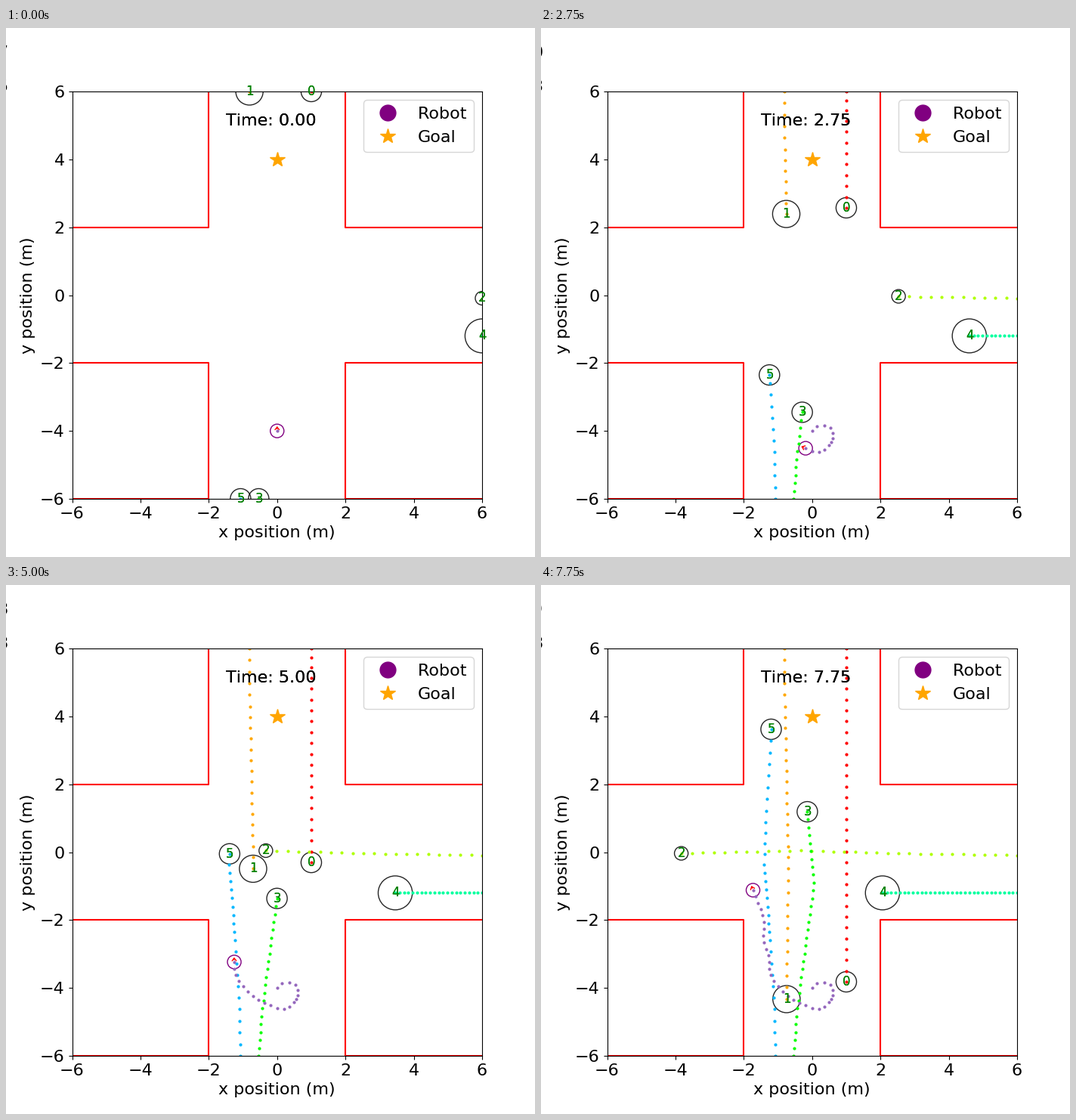
A matplotlib script that plays this animation: 700 px wide and 700 px high, repeating every 8000 ms.

```python
import random

import numpy as np
import matplotlib
import matplotlib.pyplot as plt
from matplotlib.animation import FuncAnimation
from matplotlib.lines import Line2D
from matplotlib.patches import ArrowStyle, Circle, FancyArrowPatch

FRAMES = 32
STEP = 0.25
RADII = [0.3, 0.4, 0.2, 0.3, 0.5, 0.3]
ROBOT_R = 0.2
steps = np.arange(FRAMES)
plt.rcParams["text.kerning_factor"] = 6


def march(*keys):
    """Straight, even moves between (step, x, y) keys."""
    t, x, y = np.transpose(keys)
    return np.column_stack([np.interp(steps, t, x), np.interp(steps, t, y)])


def curve(*keys):
    """Smooth cubic path through (step, x, y) keys."""
    keys = np.array(keys, float)
    t, p = keys[:, 0], keys[:, 1:]
    slope = np.gradient(p, t, axis=0)
    i = np.clip(np.searchsorted(t, steps, "right") - 1, 0, len(t) - 2)
    span = (t[i + 1] - t[i])[:, None]
    u = (steps - t[i])[:, None] / span
    ease = u * u * (3 - 2 * u)
    return (p[i] + (p[i + 1] - p[i]) * ease
            + span * u * (1 - u) * (slope[i] * (1 - u) - slope[i + 1] * u))


people = [
    march((0, 1, 6), (2, 1, 5.45), (31, 1, -3.82)),
    march((0, -.81, 6), (5, -.80, 4.29), (19, -.70, -.14), (31, -.75, -4.33)),
    march((0, 6, -.09), (11, 2.53, -.035), (20, -.33, .045),
          (31, -3.83, -.035)),
    march((0, -.54, -6), (5, -.46, -4.84), (11, -.29, -3.45),
          (22, .06, -.9), (31, -.14, 1.19)),
    march((0, 6, -1.2), (31, 2.06, -1.2)),
    march((0, -1.07, -6), (5, -1.12, -4.285), (10, -1.23, -2.6),
          (19, -1.40, -.36), (23, -1.365, .88), (31, -1.20, 3.62)),
]
robot = curve((0, 0, -4), (1, .14, -3.86), (3, .54, -3.91), (5, .60, -4.22),
              (7, .485, -4.42), (9, .21, -4.63), (11, -.19, -4.51),
              (15, -.86, -4.11), (18, -1.21, -3.62), (21, -1.28, -3.04),
              (23, -1.42, -2.66), (26, -1.41, -2.06), (31, -1.73, -1.12))
# The robot faces along its latest move; it starts facing up
moves = np.diff(robot, axis=0, prepend=[(0, -4.2)])
heading = moves / np.linalg.norm(moves, axis=1, keepdims=True)

fig, ax = plt.subplots(figsize=(7, 7), dpi=100)
ax.set_xlim(-6, 6)
ax.set_ylim(-6, 6)
ax.tick_params(labelsize=16)
ax.set_xlabel("x position (m)", fontsize=16)
ax.set_ylabel("y position (m)", fontsize=16)

for side in (-1, 1):
    ax.plot([6 * side, 2 * side, 2 * side], [2, 2, 6], color="red")
    ax.plot([6 * side, 2 * side, 2 * side, 6 * side], [-2, -2, -6, -6],
            color="red")


def marker(shape, color):
    return Line2D([0], [4], color=color, marker=shape, ls="None", markersize=15)


goal = ax.add_line(marker("*", "orange"))
ax.legend([marker("o", "purple"), goal], ["Robot", "Goal"],
          fontsize=16, loc="upper right")


def trail(color):
    return ax.plot([], [], ".", color=color, ms=4)[0]


def ring(radius, color, alpha=1):
    return ax.add_patch(Circle((0, 0), radius, fill=False, edgecolor=color,
                               alpha=alpha))


def doubled(x, y, text="", **style):
    """Text laid down twice, which gives it heavier edges."""
    return [ax.text(x, y, text, **style) for _ in range(2)]


hues = matplotlib.colormaps["hsv"].resampled(10)
paths = people + [robot]
trails = [trail(hues(i)) for i in range(len(people))] + [trail("tab:purple")]
rings = [ring(r, "black", 0.85) for r in RADII] + [ring(ROBOT_R, "purple")]
labels = [doubled(0, 0, str(i), color="green", fontsize=12)
          for i in range(len(people))]
clocks = doubled(-1.5, 5, fontsize=16)
arrow = ax.add_patch(FancyArrowPatch(
    (0, 0), (0, 1), color="red",
    arrowstyle=ArrowStyle("->", head_length=2.5, head_width=2)))

# Last digits of two readouts that run off the left edge
rng = random.Random(5)
readouts = [(ax.text(-8.2, y, "", fontsize=16), rng.choices("0356789", k=FRAMES))
            for y in (7, 6)]


def draw(n):
    for path, dots, circle in zip(paths, trails, rings):
        dots.set_data(*path[:n + 1].T)
        circle.center = tuple(path[n])
    for path, pair in zip(people, labels):
        for label in pair:
            label.set_position(path[n] - 0.11)
    for clock in clocks:
        clock.set_text(f"Time: {n * STEP:.2f}")
    for text, digits in readouts:
        text.set_text(digits[n])
    arrow.set_positions(tuple(robot[n]), tuple(robot[n] + ROBOT_R * heading[n]))
    return []


anim = FuncAnimation(fig, draw, frames=FRAMES, init_func=lambda: draw(0),
                     interval=1000 * STEP, repeat=True, repeat_delay=0)
plt.show()
```
